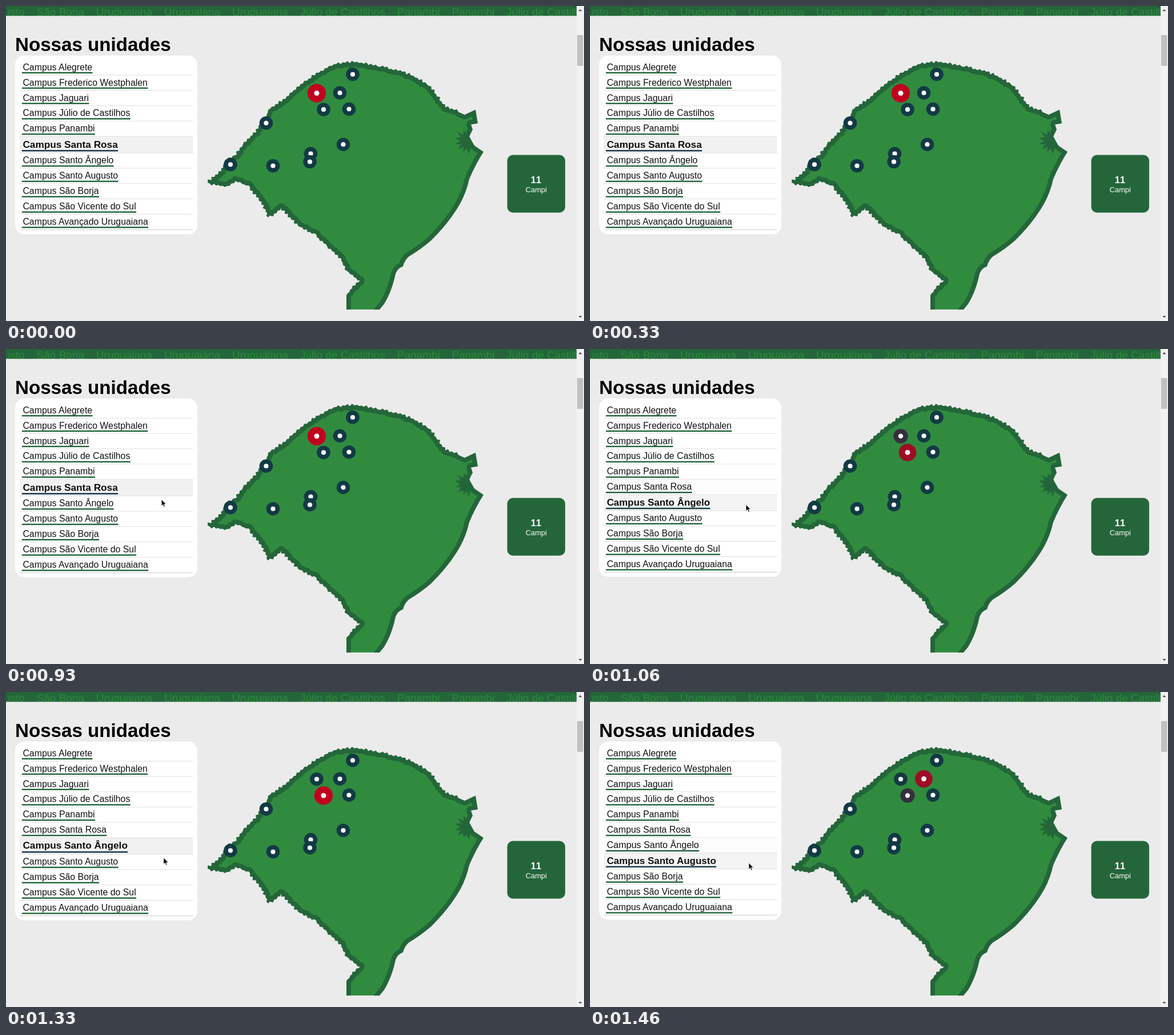
Write an HTML page that moves like this. It is 1012x553 px and loops after 1530 ms.

```html
<!DOCTYPE html>
<html lang="pt-BR">
<head>
<meta charset="utf-8">
<title>Nossas unidades</title>
<style>
html, body { margin: 0; width: 100%; height: 100%; overflow: hidden; background: #ebebeb; }
svg { display: block; width: 1012px; height: 553px; font-family: "Liberation Sans", Arial, sans-serif; }
</style>
</head>
<body>
<svg id="stage" viewBox="0 0 1012 553"></svg>
<script>
const NS = 'http://www.w3.org/2000/svg';
const stage = document.getElementById('stage');
const DARK = '#24663a', LIGHT = '#308b3f';
const NAVY = [18, 58, 68], RED = [193, 2, 31], BAR = [32, 101, 57], INK = [18, 50, 72];

function set(el, attrs) {
  for (const k in attrs) el.setAttribute(k, attrs[k]);
  return el;
}
function add(tag, attrs, parent = stage) {
  return parent.appendChild(set(document.createElementNS(NS, tag), attrs));
}
function label(str, x, y, size, attrs, parent) {
  const el = add('text', { x, y, 'font-size': size, ...attrs }, parent);
  el.textContent = str;
  return el;
}
const box = (x, y, width, height, fill, rx = 0) => add('rect', { x, y, width, height, fill, rx });
const lerp = (a, b, p) => a + (b - a) * p;
const mix = (a, b, p) => `rgb(${a.map((v, i) => Math.round(lerp(v, b[i], p)))})`;

const defs = add('defs', {});
function clipped(id, tag, attrs, parent) {
  add(tag, attrs, add('clipPath', { id }, defs));
  return add('g', { 'clip-path': `url(#${id})` }, parent);
}

// Page background and top ribbon
box(0, 0, 1012, 553, '#ebebeb');
box(0, 0, 999, 17.3, DARK);
const ribbon = clipped('ribbon', 'rect', { width: 999, height: 17.3 });
let left = -90.8;
for (const town of ['Santo Augusto', 'São Borja', 'Uruguaiana', 'Uruguaiana', 'Uruguaiana',
  'Júlio de Castilhos', 'Panambi', 'Panambi', 'Júlio de Castilhos']) {
  left += label(town, left, 17.2, 19, { fill: '#2f883f' }, ribbon).getComputedTextLength() + 20.8;
}
label('Nossas unidades', 16, 79, 33.15, { 'font-weight': 700 });

// Map: key points of the coast joined by rough lines, then the smooth eastern shore
const coast = [
  [596, 508], [620, 482], [597, 465], [587, 443], [560, 418], [540, 399], [515, 388], [482, 354],
  [459, 371], [452, 350], [425, 315], [402, 307], [387, 316], [353, 310], [377, 290], [388, 270],
  [404, 261], [415, 243], [438, 222], [456, 194], [463, 180], [483, 168], [520, 136], [548, 117],
  [578, 102], [610, 99], [655, 107], [686, 114], [709, 122], [740, 140], [769, 178], [792, 186]
];
const shore = 'L803 191L822 182L826 206L814 208L817 217L811 229L820 245L836 256' +
  'Q822 278 811 304Q806 327 795 347Q777 379 745 411Q728 426 705 440Q698 446 695 457' +
  'Q686 460 682 470Q676 500 662 523L644 545H596Z';

let seed = 11;
function rand() {
  seed = (seed * 16807) % 2147483647;
  return seed / 2147483647;
}
function roughLine(pts) {
  let d = 'M' + pts[0];
  for (let i = 1; i < pts.length; i++) {
    const [x0, y0] = pts[i - 1], [x1, y1] = pts[i];
    const len = Math.hypot(x1 - x0, y1 - y0), n = Math.round(len / 4);
    for (let k = 1; k < n; k++) {
      const off = 1 + (k % 2 ? 3 : -2) * rand();
      d += `L${lerp(x0, x1, k / n) + (y1 - y0) / len * off} ${lerp(y0, y1, k / n) - (x1 - x0) / len * off}`;
    }
    d += 'L' + pts[i];
  }
  return d;
}
const land = roughLine(coast) + shore;
const map = clipped('bottom', 'rect', { width: 1012, height: 532.7 });
const inner = clipped('land', 'path', { d: land }, map);
add('path', { d: land, fill: LIGHT, stroke: DARK, 'stroke-width': 16, 'stroke-linejoin': 'round' }, inner);

// Spiky bay on the east side
const spikes = Array.from({ length: 17 }, (_, i) => {
  const a = lerp(1.2, 5.1, i / 16), r = i % 2 ? 20 + 5 * rand() : 13;
  return [808 + r * Math.cos(a), 237 + r * Math.sin(a)];
});
add('polygon', { points: spikes.join(' '), fill: DARK }, inner);

// Pins; those of the hovered rows are keyed by row
const pins = [[607, 120], [544, 153], [584.5, 152.5], [556, 181.7], [600.5, 181], [455.5, 205.5],
  [590.5, 243], [533.5, 259.3], [532, 273.5], [393, 278.3], [467.5, 280.5]].map(([cx, cy]) => ({
  disc: add('circle', { cx, cy, r: 11.8, fill: mix(NAVY, RED, 0) }),
  dot: add('circle', { cx, cy, r: 4.1, fill: '#fff' })
}));
const rowPins = { 5: pins[1], 6: pins[3], 7: pins[2] };

// Counter tile
box(877.6, 261.6, 101.4, 101.2, DARK, 10);
const white = { fill: '#fff', 'text-anchor': 'middle', 'font-kerning': 'none' };
label('11', 928, 310.5, 16.5, { ...white, 'font-weight': 700, style: 'font-kerning:none' });
label('Campi', 928.3, 326.6, 12.8, white);

// Campus list
const card = box(16, 87, 319, 314, '#fff', 16);
const rows = ['Alegrete', 'Frederico Westphalen', 'Jaguari', 'Júlio de Castilhos', 'Panambi',
  'Santa Rosa', 'Santo Ângelo', 'Santo Augusto', 'São Borja', 'São Vicente do Sul',
  'Avançado Uruguaiana'].map(name => ({
  back: box(24, 0, 303.5, 27),
  rule: box(24, 0, 303.5, 1, '#c8c8c8'),
  bar: box(27.8, 0, 0, 2.4),
  text: label('Campus ' + name, 29.4, 0, 16, { fill: '#111' })
}));

// Scrollbar
box(999, 0, 13, 553, '#f1f1f1');
box(1000, 51, 10.5, 54, '#c1c1c1');
add('path', { d: 'M1002.5 9h6l-3-3.6zM1002.5 544h6l-3 3.6z', fill: '#505050' });

const cursor = add('path', {
  d: 'M0 0V11.2L2.6 8.8L4.4 13L6.2 12.2L4.4 8.2H8Z',
  fill: '#000', stroke: '#fff', 'stroke-width': .7
});

const LOOP = 1530, TICK = 1000 / 15;
const SHOW = 11 * TICK, END = 22 * TICK;   // cursor travel
const HOVER = 966, GAP = 400, FADE = 200;  // row changes

function fade(t, start) {
  const x = Math.min(1, Math.max(0, (t - start) / FADE));
  return 1 - (1 - x) ** 2.3;
}

function draw(now) {
  const t = Math.floor((now % LOOP + 7) / TICK) * TICK;
  const p = fade(t, HOVER), q = fade(t, HOVER + GAP);
  const weight = { 5: 1 - p, 6: p - q, 7: q };
  const active = q > 0 ? 7 : p > 0 ? 6 : 5;

  let top = 94.6;
  rows.forEach((row, i) => {
    const w = weight[i] || 0;
    const extra = w > .9 ? 2 : w > .35 ? 1 : 0;   // line height grows by whole pixels
    const h = 26.93 + extra * 1.07;
    set(row.back, { y: top, height: h, fill: mix([255, 255, 255], [241, 241, 242], w) });
    set(row.rule, { y: top + h - .6 });
    set(row.text, {
      y: top + 18.1 + extra * .6,
      'font-size': 15.88 + 1.34 * w,
      'font-weight': i === active ? 700 : 400
    });
    set(row.bar, {
      y: top + h - 5.5,
      width: row.text.getComputedTextLength() + 2,
      fill: mix(BAR, INK, w)
    });
    top += h;
  });
  set(card, { height: top + 7.8 - 87 });

  for (const i in rowPins) {
    set(rowPins[i].disc, { r: 11.8 + 4.4 * weight[i], fill: mix(NAVY, RED, weight[i]) });
    set(rowPins[i].dot, { r: 4.1 + .4 * weight[i] });
  }

  const s = Math.max(0, (t - SHOW) / (END - SHOW));
  set(cursor, {
    visibility: t < SHOW ? 'hidden' : 'visible',
    transform: `translate(${271.8 + 6.2 * s * s} ${251 + 49 * s})`
  });
}

const begin = performance.now();
function tick() {
  draw(performance.now() - begin);
  requestAnimationFrame(tick);
}
tick();
</script>
</body>
</html>
```
